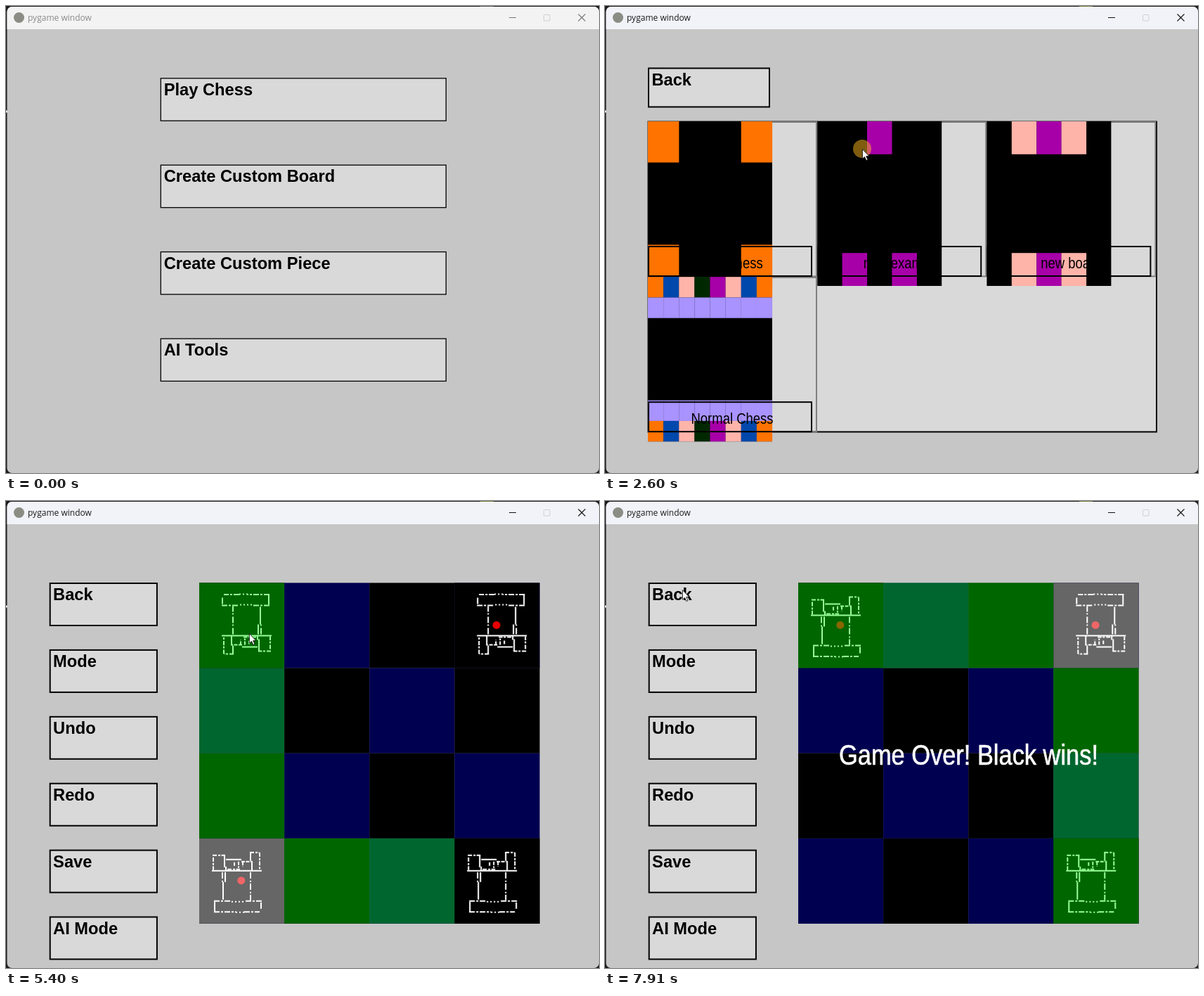
Animation of 844x664 px, one loop 8000 ms. Source, as an HTML page:

```html
<!DOCTYPE html>
<html lang="en">
<head>
<meta charset="utf-8">
<title>Custom chess</title>
<style>
  html, body { margin: 0; width: 100%; height: 100%; overflow: hidden; background: #1c1c1c; }
  svg { display: block; width: 844px; height: 664px; }
  .label { font: bold 23.7px "Liberation Sans", Arial, sans-serif; }
  .name { font: 22px "Liberation Sans", Arial, sans-serif; text-anchor: middle; }
  .over { font: 40px "Liberation Sans", Arial, sans-serif; text-anchor: middle; fill: #fff; stroke: #fff; stroke-width: .7; }
  .title { font: 12px "Open Sans", "Noto Sans", sans-serif; }
  .rook { fill: none; stroke: #fff; stroke-width: 2; }
</style>
</head>
<body>
<svg id="stage" viewBox="0 0 844 664"></svg>
<script>
const LOOP = 8000;
const stage = document.getElementById('stage');

function add(parent, tag, attrs = {}, text) {
  const el = document.createElementNS('http://www.w3.org/2000/svg', tag);
  for (const key in attrs) el.setAttribute(key, attrs[key]);
  if (text) el.textContent = text;
  parent.appendChild(el);
  return el;
}
const group = (parent, attrs) => add(parent, 'g', attrs);
const rect = (parent, x, y, width, height, fill, more) =>
  add(parent, 'rect', { x, y, width, height, fill, ...more });
const path = (parent, d, more) => add(parent, 'path', { d, fill: 'none', ...more });
const show = (el, on) => el.setAttribute('visibility', on ? 'visible' : 'hidden');

function button(parent, x, y, w, h, line, text) {
  rect(parent, x, y, w, h, '#d9d9d9', { stroke: '#000', 'stroke-width': line });
  add(parent, 'text', { x: x + 4.4, y: y + 24.2, class: 'label' }, text);
}

// Window frame
rect(stage, 0, 0, 844, 664, '#1c1c1c');
rect(stage, 0, 148.5, 2, 3, '#eee');
const topMark = rect(stage, 675, 0, 19, 1, '#555');
rect(stage, 1.5, 1, 842.5, 663, '#c6c6c6', { rx: 7 });
const bar = path(stage, 'M1.5 33V8a7 7 0 0 1 7-7H837a7 7 0 0 1 7 7V33Z');
add(stage, 'circle', { cx: 18.5, cy: 16.5, r: 7.5, fill: '#8b8d84' });
const title = add(stage, 'text', { x: 31, y: 21, class: 'title' }, 'pygame window');
const controls = path(stage, 'M716 16.5H726M814.5 11.5l10 10M824.5 11.5l-10 10', { 'stroke-width': 1.1 });
rect(stage, 765.5, 12.5, 8.5, 8.5, 'none', { stroke: '#cfcfd2', rx: 1 });

// Main menu
const menu = group(stage);
['Play Chess', 'Create Custom Board', 'Create Custom Piece', 'AI Tools'].forEach((text, i) =>
  button(menu, 220.3, 102.8 + i * 123.4, 406, 60.4, 1.3, text));

// Board list
const list = group(stage);
const INK = { o: '#ff7300', b: '#0048ab', p: '#ffb4aa', g: '#002800', m: '#a800a8', l: '#a893ff', '.': '#000' };
const back = 'obpgmpbo', pawns = 'llllllll', gap = '........';
const BOARDS = [
  ['new chess', ['o..o', '....', '....', 'o..o']],
  ['new example', ['..m..', '.....', '.....', '.....', '.m.m.']],
  ['new board', ['.pmp.', '.....', '.....', '.....', '.pmp.']],
  ['Normal Chess', [back, pawns, gap, gap, gap, gap, pawns, back]]
];
button(list, 62, 88.5, 172, 55, 2, 'Back');
rect(list, 61.5, 164.5, 723.5, 441, '#d9d9d9', { stroke: '#000', 'stroke-width': 2 });
BOARDS.forEach(([name, rows], i) => {
  const x = 61 + (i % 3) * 241.2, y = 164 + Math.floor(i / 3) * 221.2;
  rect(list, x + .5, y + .8, 239.5, 219.6, 'none', { stroke: '#808080', 'stroke-width': 2 });
  rect(list, x, y, 177, 234, '#000');
  const w = 177 / rows[0].length, h = 234 / rows.length;
  rows.forEach((row, r) => [...row].forEach((key, c) => {
    if (key !== '.') rect(list, x + c * w, y + r * h, w + .1, h, INK[key]);
  }));
  rect(list, x + 1, y + 178, 232, 42, 'none', { stroke: '#000', 'stroke-width': 2 });
  add(list, 'text', { transform: `translate(${x + 120} ${y + 209}) scale(.84 1)`, class: 'name' }, name);
});

// Game
const game = group(stage);
['Back', 'Mode', 'Undo', 'Redo', 'Save', 'AI Mode'].forEach((text, i) =>
  button(game, 62.7, 117 + i * 94.9, 152.2, 60, 2, text));
const CELL = 121.1;
const board = group(game, { transform: 'translate(275 116.4)' });
for (let i = 0; i < 16; i++) {
  const c = i % 4, r = i >> 2;
  rect(board, c * CELL, r * CELL, CELL + .2, CELL + .2, (c + r) % 2 ? '#000050' : '#000');
}

function rook(c, r, flipped, royal) {
  const g = group(board, { transform: `translate(${c * CELL} ${r * CELL})` });
  rect(g, 0, 0, CELL, CELL, '#000');
  const art = group(g, { class: 'rook', transform: flipped ? 'rotate(180 60.5 60.5)' : '' });
  path(art, 'M18 46H89M36 24V41M38 30H60M73 20V32M75 32V45M37 48V62M34 62V87M22 90V105');
  path(art, 'M19 24H37M20 27V45M38 40V46M72 20H85M86 20V45M40 44H58', { 'stroke-dasharray': '6 2 3 1.5' });
  path(art, 'M56 33V42M62 33V40M50 34V39M60 33H74', { 'stroke-dasharray': '5 1.5' });
  path(art, 'M33 48V64M73 48V88M88 91V103', { 'stroke-dasharray': '9 3 2 2' });
  path(art, 'M21 89H46M66 89H89M21 104.5H52M64 104.5H86', { 'stroke-dasharray': '8 2 3 2' });
  path(art, 'M46 90H66M52 105H64', { 'stroke-dasharray': '2 3' });
  if (royal) add(g, 'circle', { cx: 59.8, cy: 60, r: 5.5, fill: '#e60000' });
  return g;
}
rook(3, 3, false, false);
rook(3, 0, true, true);
const captured = rook(0, 0, true, false);
const start = rook(0, 3, false, true);
const moved = rook(0, 0, false, true);

function highlight(picked, moves) {
  const g = group(board, { opacity: .4 });
  const mark = ([c, r], fill) => rect(g, c * CELL, r * CELL, CELL, CELL, fill);
  mark(picked, '#fff');
  moves.forEach(cell => mark(cell, '#0f0'));
  return g;
}
const whiteMoves = highlight([0, 3], [[0, 0], [0, 1], [0, 2], [1, 3], [2, 3]]);
const blackMoves = highlight([3, 0], [[0, 0], [1, 0], [2, 0], [3, 1], [3, 2], [3, 3]]);
const gameOver = add(game, 'text', { transform: 'translate(517.5 374.5) scale(.86 1)', class: 'over' },
  'Game Over! Black wins!');

// Pointer and click ring
const ring = add(stage, 'circle', { r: 13, 'fill-opacity': .5 });
const pointer = path(stage, 'M.4 .6V14.2L3.5 11.4L5.9 16.6L8 15.6L5.7 10.6H9.9Z',
  { fill: '#fff', stroke: '#111', 'stroke-width': .9 });

// time, x, y
const TRACK = [
  [100, 548, 618], [700, 405, 141], [900, 405, 141], [1500, 356, 130], [1800, 356, 130],
  [2200, 366, 203], [2600, 366, 203], [3100, 184, 258], [3500, 184, 258], [4400, 355, 542],
  [4500, 355, 542], [4800, 345, 540], [4900, 345, 540], [5400, 346, 188], [5710, 346, 188],
  [6210, 723, 186], [6310, 723, 186], [6610, 356, 188], [6710, 346, 188], [6910, 346, 188],
  [7210, 354, 230], [7710, 142, 178], [7910, 110, 126]
];
// start, end, colour
const CLICKS = [
  [2600, 2700, '#ffb81e'], [3300, 3400, '#fff50a'], [4900, 5000, '#fff50a'],
  [5500, 5610, '#fff50a'], [6310, 6410, '#fff50a'], [6910, 7010, '#fff50a']
];

function pointerAt(t) {
  const i = TRACK.findIndex(key => key[0] > t);
  if (i < 0) return TRACK[TRACK.length - 1].slice(1);
  if (i === 0) return TRACK[0].slice(1);
  const [t0, x0, y0] = TRACK[i - 1], [t1, x1, y1] = TRACK[i];
  const k = (t - t0) / (t1 - t0), e = k * k * (3 - 2 * k);
  return [x0 + (x1 - x0) * e, y0 + (y1 - y0) * e];
}

const snap = t => t < 5610 ? Math.min(5500, Math.floor(t / 100) * 100) : Math.floor((t - 10) / 100) * 100 + 10;

function draw(time) {
  const t = snap(time % LOOP);
  const active = t >= 1000;
  bar.setAttribute('fill', active ? '#f1f3f9' : '#f3f3f3');
  title.setAttribute('fill', active ? '#1b1b1b' : '#8a8a8a');
  controls.setAttribute('stroke', active ? '#111' : '#777');
  topMark.setAttribute('fill', active ? '#77773a' : '#555');

  const playing = t >= 3300;
  menu.style.display = t < 2600 ? '' : 'none';
  list.style.display = t >= 2600 && !playing ? '' : 'none';
  game.style.display = playing ? '' : 'none';

  const taken = t >= 5500;
  show(captured, !taken);
  show(start, !taken);
  show(moved, taken);
  show(whiteMoves, t >= 4900 && !taken);
  show(blackMoves, t >= 6310);
  show(gameOver, t >= 6910);

  const [x, y] = pointerAt(t);
  pointer.setAttribute('transform', `translate(${x} ${y})`);
  show(pointer, t >= 100);
  const click = CLICKS.find(([from, to]) => t >= from && t < to);
  show(ring, click);
  if (click) {
    ring.setAttribute('cx', x);
    ring.setAttribute('cy', y);
    ring.setAttribute('fill', click[2]);
  }
}

const began = performance.now();
function tick() {
  draw(performance.now() - began);
  requestAnimationFrame(tick);
}
tick();
</script>
</body>
</html>
```
